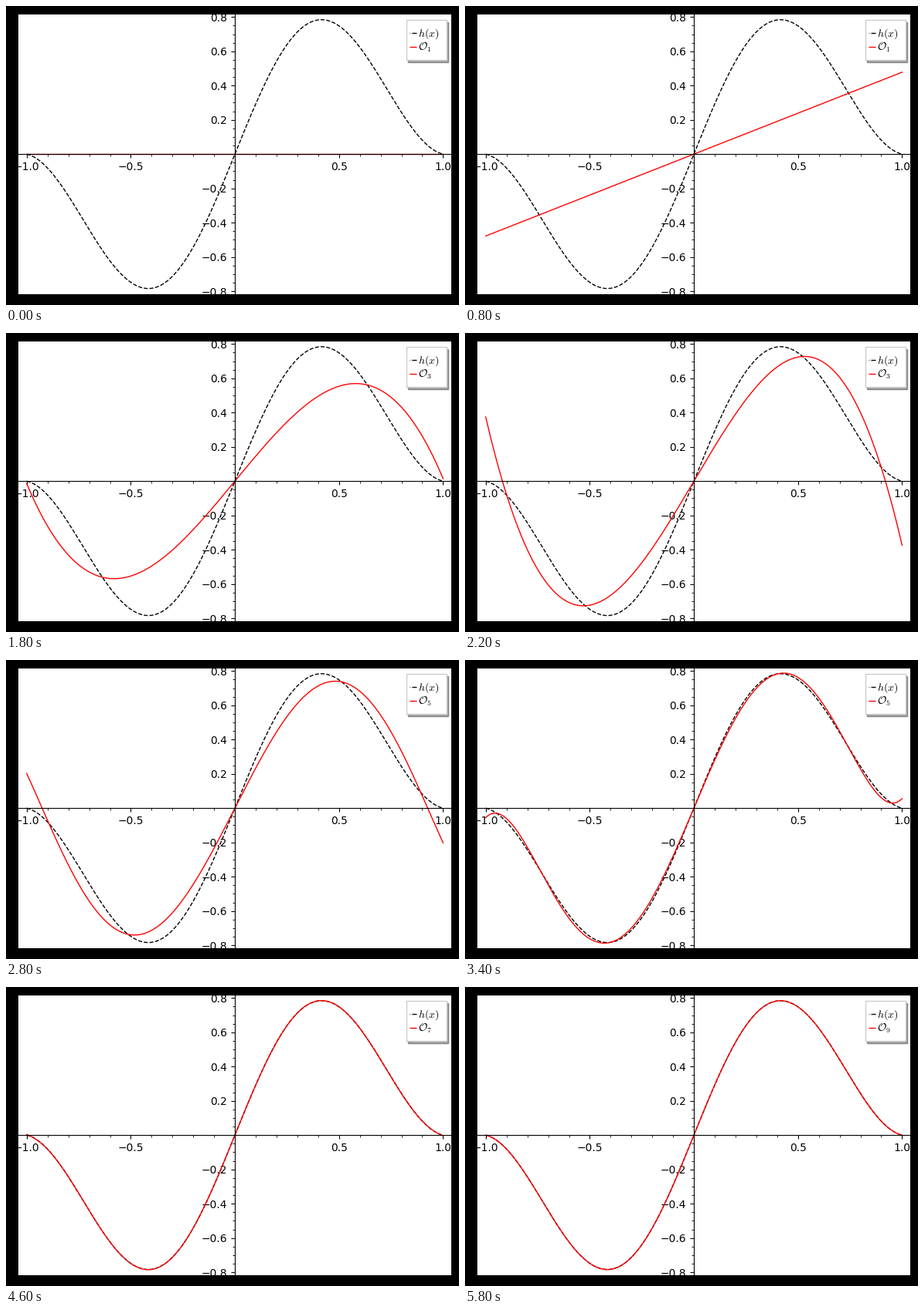
Write a matplotlib script that moves like this. It is 586 px wide and 388 px high and loops after 6000 ms.

```python
import numpy as np
from numpy.polynomial import legendre as leg
import matplotlib.pyplot as plt
from matplotlib.animation import FuncAnimation
from matplotlib.patches import Rectangle
from matplotlib.ticker import AutoMinorLocator

plt.rcParams.update({"font.family": "DejaVu Sans", "font.size": 10,
                     "mathtext.fontset": "cm"})

W, H, DPI = 586, 388, 100
STEPS = 6                     # frames spent blending in each order
ORDERS = [1, 3, 5, 7, 9]


def h(x):
    return (1 - x**2) * np.sin(3 * x)


# Legendre projection of h on [-1, 1]
nodes, weights = leg.leggauss(40)
coef = np.zeros(ORDERS[-1] + 1)
for n in ORDERS:
    p_n = leg.legval(nodes, np.eye(len(coef))[n])
    coef[n] = (2 * n + 1) / 2 * np.sum(weights * h(nodes) * p_n)

x = np.linspace(-1, 1, 401)

fig = plt.figure(figsize=(W / DPI, H / DPI), dpi=DPI, facecolor="black")


def add_plot(left, top, right, bottom):
    ax = fig.add_axes([left / W, 1 - bottom / H,
                       (right - left) / W, (bottom - top) / H])
    top_y = 1.04 * h(x).max()
    ax.set(xlim=(-1.04, 1.04), ylim=(-top_y, top_y))
    for side in ("left", "bottom"):
        ax.spines[side].set_position("zero")
    for side in ("right", "top"):
        ax.spines[side].set_visible(False)
    ax.set_xticks([-1, -0.5, 0.5, 1])
    ax.set_yticks([s * v for s in (-1, 1) for v in (0.2, 0.4, 0.6, 0.8)])
    ax.xaxis.set_minor_locator(AutoMinorLocator(5))
    ax.yaxis.set_minor_locator(AutoMinorLocator(4))
    return ax


ax = add_plot(16, 10.8, 576.2, 373.6)
ax.plot(x, h(x), "--", color="black", lw=1)
approx, = ax.plot(x, 0 * x, color="red", lw=1)

# Legend, laid out in pixels
box = fig.add_axes([0, 0, 1, 1])
box.set(xlim=(0, W), ylim=(H, 0))
box.axis("off")
box.add_patch(Rectangle((520.3, 20.8), 52, 52, fc="0.3", ec="0.24",
                        lw=1, alpha=0.5))
box.add_patch(Rectangle((517.5, 18), 52, 52, fc="white", ec="0.8", lw=1))


def handle(x0, x1, y, color):
    box.plot([x0, x1], [y, y], color=color, lw=1, solid_capstyle="butt")


handle(522, 523, 35, "0.4")
handle(525.4, 530.6, 35, "black")
handle(522, 531, 53, "red")
box.text(533.3, 40, "$h(x)$", va="baseline")
order_label = box.text(533.3, 58, "", va="baseline")


def draw(frame):
    stage, step = divmod(frame, STEPS)
    n = ORDERS[stage]
    c = coef[:n + 1].copy()
    c[n] *= step / (STEPS - 1)
    approx.set_ydata(leg.legval(x, c))
    order_label.set_text(rf"$\mathcal{{O}}_{n}$")
    return approx, order_label


anim = FuncAnimation(fig, draw, frames=STEPS * len(ORDERS), interval=200,
                     repeat=True, repeat_delay=0, blit=False)
plt.show()
```
